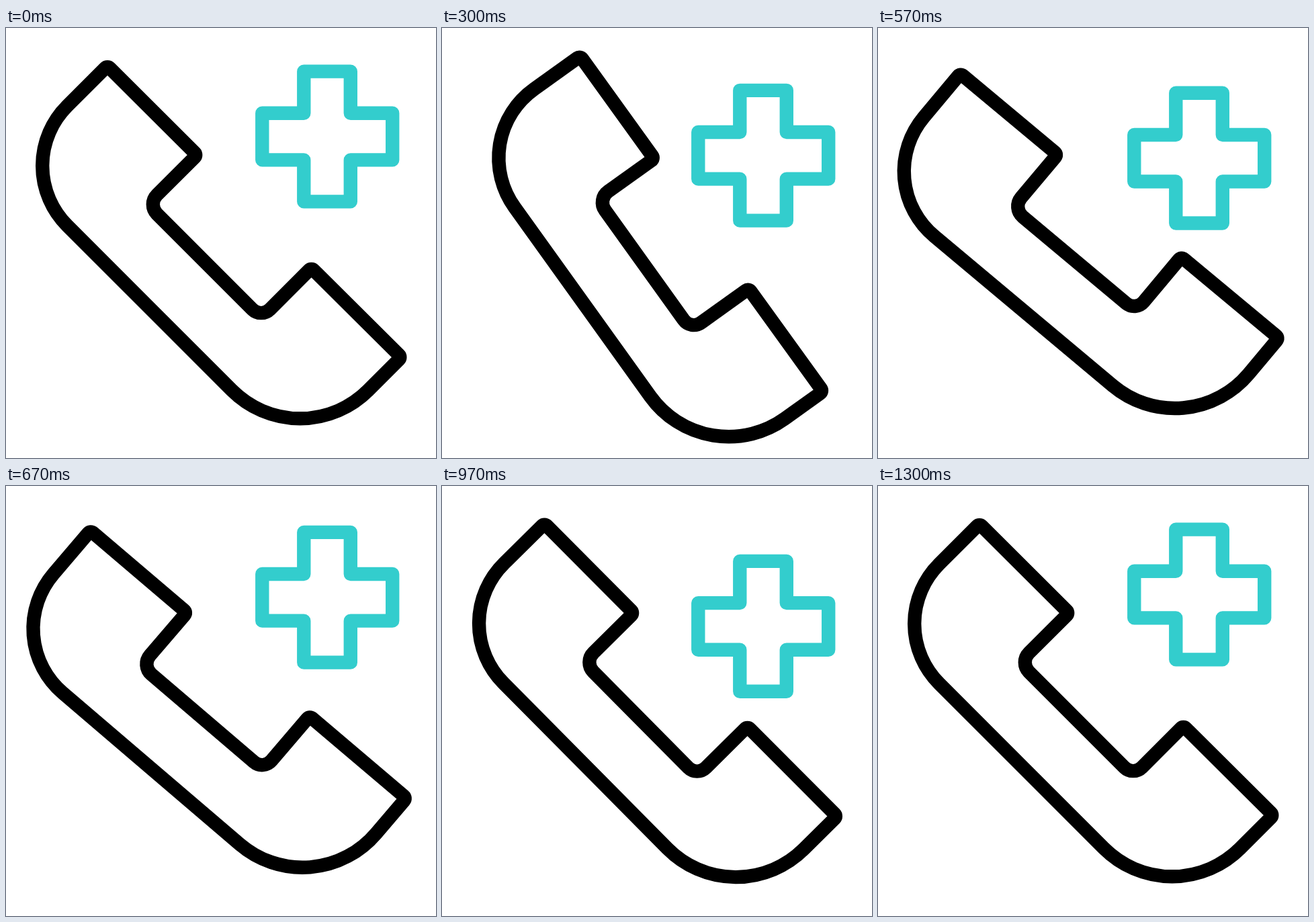
Animation of 640x640 px, one loop 1.67 s. Source, as an HTML page with a canvas:

```html
<!DOCTYPE html>
<html lang="en">
<head>
<meta charset="utf-8">
<title>Emergency call</title>
<style>
  html, body { margin: 0; width: 100%; height: 100%; overflow: hidden; background: #fff; }
  canvas { display: block; width: 100vw; height: 100vh; }
</style>
</head>
<body>
<canvas id="stage" width="640" height="640"></canvas>
<script>
const ctx = document.getElementById('stage').getContext('2d');
const LOOP = 1670;
const STEP = 100 / 3;
const LINE = 20.4;
const PIVOT = { x: 267, y: 384 };

// Corners of the handset: x, y, radius
const HANDSET = [
  [2.1, 205.1, 125.8], [151, 56.2, 5], [284.3, 189, 5], [210.5, 262.5, 20],
  [379.75, 431.75, 18.5], [454.5, 357, 5], [588.4, 490, 5], [437.7, 640.7, 143.4]
];

// Keys: step, value
const SWING = { ease: 0.43, keys: [[4, 0], [11.55, 12.2], [18.15, -6.15], [24.4, 3.1], [30.2, 0]] };
const DROP = { ease: 0.55, keys: [[4.1, 0], [13.2, 48.3], [22.2, 0], [30, 48.3], [39.05, 0]] };

// Symmetric cubic bezier (a, 0, 1 - a, 1), solved by bisection
function easeInOut(t, a) {
  let low = 0, high = 1, s = 0.5;
  for (let i = 0; i < 24; i++) {
    s = (low + high) / 2;
    const x = 3 * (1 - s) * s * ((1 - s) * a + s * (1 - a)) + s ** 3;
    if (x < t) low = s; else high = s;
  }
  return s * s * (3 - 2 * s);
}

function valueAt({ ease, keys }, step) {
  if (step <= keys[0][0]) return keys[0][1];
  for (let i = 1; i < keys.length; i++) {
    const [from, a] = keys[i - 1];
    const [to, b] = keys[i];
    if (step < to) return a + (b - a) * easeInOut((step - from) / (to - from), ease);
  }
  return keys[keys.length - 1][1];
}

function drawHandset(degrees) {
  ctx.save();
  ctx.translate(PIVOT.x, PIVOT.y);
  ctx.rotate(degrees * Math.PI / 180);
  ctx.translate(-PIVOT.x, -PIVOT.y);
  ctx.beginPath();
  ctx.moveTo(219.9, 422.9);
  HANDSET.forEach(([x, y, r], i) => {
    const [nextX, nextY] = HANDSET[(i + 1) % HANDSET.length];
    ctx.arcTo(x, y, nextX, nextY, r);
  });
  ctx.closePath();
  ctx.strokeStyle = '#000';
  ctx.stroke();
  ctx.restore();
}

function drawCross(offset) {
  const [x0, x1, x2, x3] = [381.3, 443.3, 512.8, 575.2];
  const [y0, y1, y2, y3] = [64.6, 126.8, 196.4, 258.4].map(y => y + offset);
  const corners = [
    [x1, y0], [x2, y0], [x2, y1], [x3, y1], [x3, y2], [x2, y2],
    [x2, y3], [x1, y3], [x1, y2], [x0, y2], [x0, y1], [x1, y1]
  ];
  ctx.beginPath();
  corners.forEach(([x, y]) => ctx.lineTo(x, y));
  ctx.closePath();
  ctx.strokeStyle = '#33cdcd';
  ctx.stroke();
}

function render(now) {
  const step = Math.floor((now % LOOP + 3.4) / STEP);
  ctx.fillStyle = '#fff';
  ctx.fillRect(0, 0, 640, 640);
  ctx.lineWidth = LINE;
  ctx.lineJoin = 'round';
  drawHandset(valueAt(SWING, step));
  drawCross(valueAt(DROP, step));
}

let start;
function tick(now) {
  start ??= now;
  render(now - start);
  requestAnimationFrame(tick);
}
render(0);
requestAnimationFrame(tick);
</script>
</body>
</html>
```
